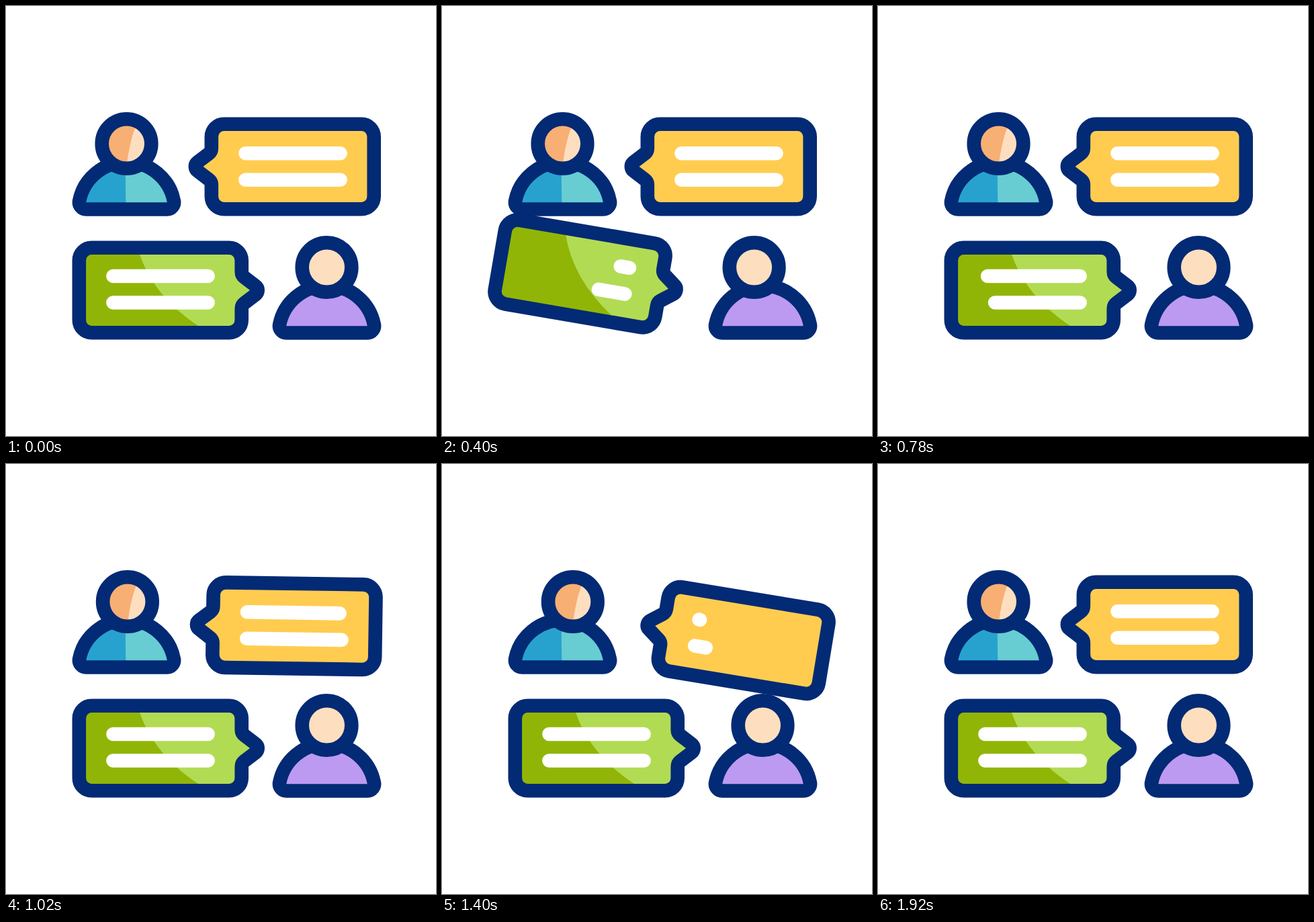
These frames come from a looping animation (640 by 640 pixels, 2020 ms). An HTML page:

```html
<!DOCTYPE html>
<html lang="en">
<head>
<meta charset="utf-8">
<title>Chat</title>
<style>
html, body { margin: 0; height: 100%; overflow: hidden; background: #fff; }
svg { display: block; width: 100vw; height: 100vh; }
.ink { stroke: #032a74; stroke-width: 20.6; stroke-linejoin: round; }
.text { stroke: #fff; stroke-width: 20.6; stroke-linecap: round; }
</style>
</head>
<body>
<svg viewBox="0 0 640 640">
  <defs>
    <path id="bubble" d="M127.5 359.7H332a18.7 18.7 0 0 1 18.7 18.7V395.8a10 10 0 0 0 4 8L371.5 416.6a8 8 0 0 1 0 12.8L354.7 442.2a10 10 0 0 0-4 8V467.6a18.7 18.7 0 0 1-18.7 18.7H127.5a18.7 18.7 0 0 1-18.7-18.7V378.4a18.7 18.7 0 0 1 18.7-18.7z"/>
    <path id="body" d="M119.2 302.5H239.8a10.3 10.3 0 0 0 10.1-12.2A71.7 71.7 0 0 0 109.1 290.3a10.3 10.3 0 0 0 10.1 12.2z"/>
    <circle id="head" cx="179.5" cy="205" r="36.8"/>
    <clipPath id="inBubble"><use href="#bubble"/></clipPath>
    <clipPath id="inBody"><use href="#body"/></clipPath>
    <clipPath id="inHead"><use href="#head"/></clipPath>
  </defs>

  <use href="#body" fill="#67cdd2"/>
  <path d="M178.5 225Q177 265 179 310H90V225z" fill="#27a2ce" clip-path="url(#inBody)"/>
  <use href="#body" class="ink" fill="none"/>
  <g id="headA">
    <use href="#head" fill="#fddfbf"/>
    <path d="M199 165Q183 198 179 245H130V165z" fill="#f8af74" clip-path="url(#inHead)"/>
    <use href="#head" class="ink" fill="none"/>
  </g>

  <g transform="translate(298 184)">
    <use href="#body" class="ink" fill="#bc9af2"/>
    <g id="headB"><use href="#head" class="ink" fill="#fddfbf"/></g>
  </g>

  <g id="green">
    <use href="#bubble" fill="#b2db54"/>
    <path d="M195 355L199 370Q221 433 286 476L306 489H100V355z" fill="#91b506" clip-path="url(#inBubble)"/>
    <use href="#bubble" class="ink" fill="none"/>
    <path class="text"/><path class="text"/>
  </g>

  <g id="yellow">
    <use href="#bubble" class="ink" fill="#ffcc50" transform="rotate(180 328.25 331)"/>
    <path class="text"/><path class="text"/>
  </g>
</svg>
<script>
const LOOP = 2020, TURN = 940, TILT = 9.8, LINE = 141.2;
const $ = id => document.getElementById(id);
const part = (t, a, b) => Math.min(1, Math.max(0, (t - a) / (b - a)));
const smooth = x => (1 - Math.cos(Math.PI * x)) / 2;
const easeOut = x => 1 - (1 - x) ** 3;

const swing = t => smooth(part(t, 0, 425)) - smooth(part(t, 425, 693));
const lineLength = t =>
  t < 492 ? 1 - smooth(part(t, 35, 492)) : easeOut(part(t, 492, 902));

const speakers = [
  { bubble: $('green'), head: $('headB'), start: 0, shift: -26.5, nod: -13,
    pivot: '375 423', x: 300.6, dir: -1, rows: [402, 441.5] },
  { bubble: $('yellow'), head: $('headA'), start: TURN, shift: 25, nod: 16,
    pivot: '282 239', x: 356.4, dir: 1, rows: [219.2, 258.7] }
];

function pose(s, t) {
  const k = swing(t);
  s.bubble.setAttribute('transform',
    `translate(${s.shift * k}) rotate(${TILT * k} ${s.pivot})`);
  s.head.setAttribute('transform', `translate(${s.nod * k})`);
  s.bubble.querySelectorAll('.text').forEach((line, i) => {
    const length = LINE * lineLength(t - 72 * i);
    line.setAttribute('d', length > 0.1 ? `M${s.x} ${s.rows[i]}h${s.dir * length}` : '');
  });
}

function draw() {
  const t = performance.now() % LOOP;
  for (const s of speakers) pose(s, t - s.start);
  requestAnimationFrame(draw);
}
draw();
</script>
</body>
</html>
```
